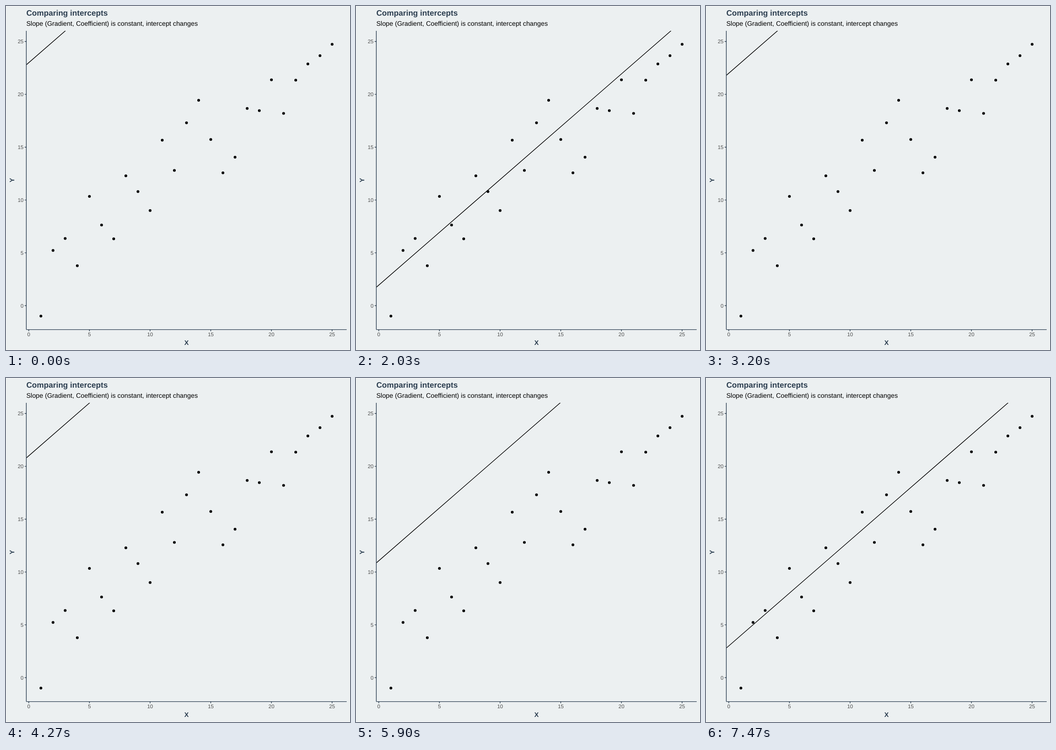
Recreate the animation shown at these times as an HTML page. Size 748 by 748 pixels, loop 8 s.

```html
<!DOCTYPE html>
<html lang="en">
<head>
<meta charset="utf-8">
<title>Comparing intercepts</title>
<style>
  html, body { margin: 0; width: 100%; height: 100%; overflow: hidden; background: #ecf0f1; }
  svg { display: block; width: 748px; height: 748px; }
  text { font-family: "Liberation Sans", Arial, sans-serif; text-rendering: geometricPrecision; }
  .heading { font-weight: bold; fill: #2c3e50; }
  .label { font-size: 11.43px; fill: #4d4d4d; }
  .axis { stroke: #2c3e50; stroke-width: 1.39; fill: none; }
</style>
</head>
<body>
<svg viewBox="0 0 748 748">
  <defs><clipPath id="panel"><rect x="44.2" y="53.9" width="696.6" height="649.7"/></clipPath></defs>
  <rect width="748" height="748" fill="#ecf0f1" stroke="#fff" stroke-width="1.39"/>
  <g id="points"></g>
  <path id="trend" clip-path="url(#panel)" fill="none" stroke="#000" stroke-width="1.39"/>
  <path class="axis" d="M44.2 53.9V703.6M44.2 703.6H740.8"/>
  <g id="ticks"></g>
  <text class="heading" x="44.2" y="21" font-size="17.14">Comparing intercepts</text>
  <text x="44.2" y="43" font-size="14.29">Slope (Gradient, Coefficient) is constant, intercept changes</text>
  <text class="heading" x="392.5" y="737.4" font-size="14.29" text-anchor="middle">X</text>
  <text class="heading" transform="translate(18 378.7) rotate(-90)" font-size="14.29" text-anchor="middle">Y</text>
</svg>
<script>
const px = x => 49.5 + x * 26.385;
const py = y => 651.5 - y * 22.968;

function add(parent, tag, attrs, text = '') {
  const node = document.createElementNS('http://www.w3.org/2000/svg', tag);
  for (const key in attrs) node.setAttribute(key, attrs[key]);
  node.textContent = text;
  document.getElementById(parent).append(node);
}

// Y values for X = 1, 2, 3 ...
const data = [-0.99, 5.22, 6.36, 3.78, 10.34, 7.63, 6.32, 12.29, 10.8, 9, 15.66, 12.8, 17.31,
  19.44, 15.73, 12.57, 14.05, 18.67, 18.46, 21.38, 18.2, 21.34, 22.88, 23.66, 24.74];
data.forEach((y, i) => add('points', 'circle', { cx: px(i + 1), cy: py(y), r: 3 }));

for (let v = 0; v <= 25; v += 5) {
  add('ticks', 'path', { class: 'axis', d: `M${px(v)} 703.6v3.6M44.2 ${py(v)}h-3.6` });
  add('ticks', 'text', { class: 'label', x: px(v), y: 718.2, 'text-anchor': 'middle' }, v);
  add('ticks', 'text', { class: 'label', x: 38.1, y: py(v) + 4.1, 'text-anchor': 'end' }, v);
}

// Each intercept holds, then moves to the next in 16 equal jumps; times count 1/30 s ticks.
const intercepts = [23, 6, 1, 22, 21, 11, 12, 3];
const TICKS = 240, PERIOD = 32, STEPS = 16;
const line = b => `path("M${px(-1)} ${py(b - 1)}L${px(27)} ${py(b + 27)}")`;
const at = (tick, b, easing = 'linear') => ({ offset: tick / TICKS, d: line(b), easing });

const frames = [at(0, intercepts[0])];
for (let i = 0; i < intercepts.length - 1; i++) {
  const start = i * PERIOD + STEPS + 0.9;
  frames.push(at(start, intercepts[i], `steps(${STEPS}, start)`), at(start + STEPS, intercepts[i + 1]));
}
frames.push(at(TICKS, intercepts.at(-1)));
document.getElementById('trend').animate(frames, { duration: 8000, iterations: Infinity });
</script>
</body>
</html>
```
